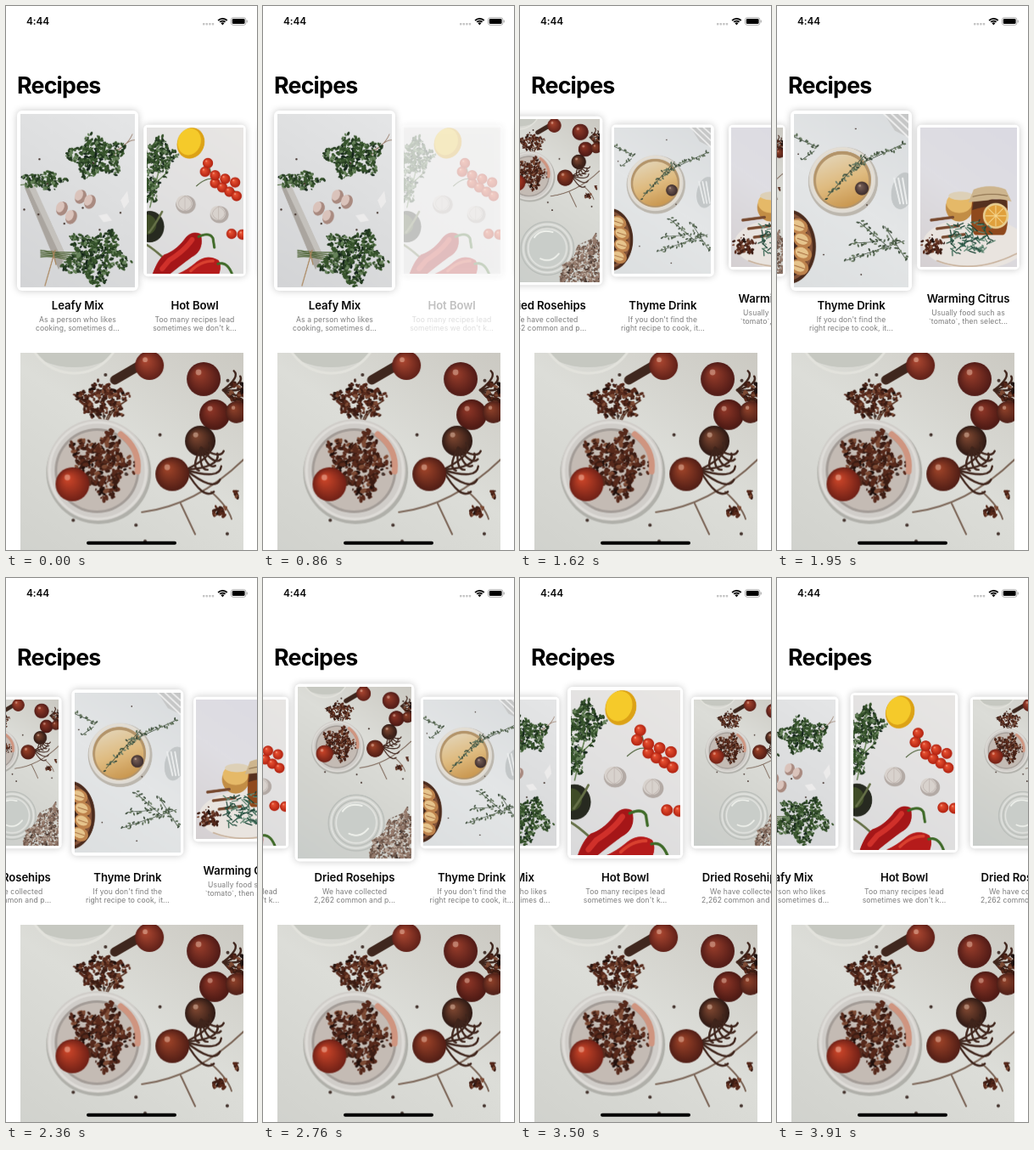
An HTML page with a canvas that plays this animation: 296x640 px, repeating every 3.98 s.

```html
<!DOCTYPE html>
<html lang="en">
<head>
<meta charset="utf-8">
<title>Recipes</title>
<style>
  html, body { margin: 0; width: 100%; height: 100%; overflow: hidden; background: #fff; }
  canvas { display: block; width: 296px; height: 640px; }
</style>
</head>
<body>
<canvas id="stage"></canvas>
<script>
const LOOP = 3980, W = 296, H = 640, TAU = Math.PI * 2;
const canvas = document.getElementById('stage');
const ctx = canvas.getContext('2d');
const ratio = Math.max(1, window.devicePixelRatio || 1);
canvas.width = W * ratio;
canvas.height = H * ratio;

// ---------- drawing helpers ----------
function seeded(seed) {
  return () => {
    seed = (seed * 1664525 + 1013904223) >>> 0;
    return seed / 4294967296;
  };
}

function repeat(n, fn) {
  for (let i = 0; i < n; i++) fn(i);
}

function oval(c, color, x, y, rx, ry = rx, turn = 0) {
  c.fillStyle = color;
  c.beginPath();
  c.ellipse(x, y, rx, ry, turn, 0, TAU);
  c.fill();
}

function ring(c, color, width, x, y, r) {
  c.strokeStyle = color;
  c.lineWidth = width;
  c.beginPath();
  c.arc(x, y, r, 0, TAU);
  c.stroke();
}

function shape(c, color, path) {
  c.fillStyle = color;
  c.fill(new Path2D(path));
}

function line(c, color, width, path) {
  c.strokeStyle = color;
  c.lineWidth = width;
  c.lineCap = 'round';
  c.stroke(new Path2D(path));
}

function backdrop(c, w, h, ...colors) {
  const g = c.createLinearGradient(w, 0, 0, h);
  colors.forEach((color, i) => g.addColorStop(i / (colors.length - 1), color));
  c.fillStyle = g;
  c.fillRect(0, 0, w, h);
}

// A ragged heap of small leaves, lighter ones mostly on top.
function clump(c, seed, x, y, rx, ry, size, colors) {
  const rnd = seeded(seed), count = 1.6 * rx * ry / (size * size);
  repeat(count, i => {
    const a = rnd() * TAU;
    const d = Math.sqrt(rnd()) * (0.85 + 0.2 * Math.sin(a * 5 + seed));
    const r = size * (0.5 + rnd());
    const shade = colors[Math.floor((i / count * 0.5 + rnd() * 0.5) * colors.length)];
    oval(c, shade, x + Math.cos(a) * d * rx, y + Math.sin(a) * d * ry, r, r * 0.6, rnd() * TAU);
  });
}

function sprig(c, seed, x0, y0, x1, y1, leaf = 2) {
  const rnd = seeded(seed), n = Math.hypot(x1 - x0, y1 - y0) / 2.4;
  const off = () => (rnd() - 0.5) * leaf * 3.4;
  line(c, THYME[0], 0.8, `M${x0} ${y0}L${x1} ${y1}`);
  repeat(n, i => {
    const x = x0 + (x1 - x0) * i / n + off(), y = y0 + (y1 - y0) * i / n + off();
    oval(c, THYME[i % THYME.length], x, y, leaf, leaf * 0.5, rnd() * TAU);
  });
}

function specks(c, seed, n, w, h, r) {
  const rnd = seeded(seed);
  repeat(n, () => oval(c, '#45352f', rnd() * w, rnd() * h, r));
}

function ball(c, x, y, r, dark, light) {
  const g = c.createRadialGradient(x - r * 0.3, y - r * 0.35, r * 0.1, x, y, r);
  g.addColorStop(0, light);
  g.addColorStop(1, dark);
  oval(c, g, x, y, r);
  oval(c, 'rgba(255,225,205,.4)', x - r * 0.3, y - r * 0.4, r * 0.17);
}

// Dry sepals fanning out from one side of a fruit.
function sepals(c, x, y, angle, length) {
  repeat(5, i => {
    const a = angle + (i - 2) * 0.38;
    const end = k => `${x + Math.cos(a + k) * length} ${y + Math.sin(a + k) * length}`;
    line(c, '#3f251c', 2.4, `M${x} ${y}Q${end(0.4)} ${end(0)}`);
  });
}

function garlic(c, x, y, r) {
  oval(c, '#b3aaa5', x + 1, y + 1, r, r * 0.92);
  oval(c, '#d8d2cd', x - 1, y - 1, r * 0.82, r * 0.76, 0.5);
  repeat(3, i => line(c, '#b9aea9', 0.7, `M${x} ${y - r * 0.8}Q${x + (i - 1) * r * 1.3} ${y} ${x} ${y + r * 0.7}`));
}

const GREENS = ['#14241a', '#22391f', '#37542c', '#66825a'];
const BROWNS = ['#20100c', '#3c1c13', '#57291b', '#7c4a34'];
const HEATHER = ['#41332d', '#6d564a', '#93796b', '#bbaa9d'];
const THYME = ['#3c4c3b', '#53664e', '#708068'];

// ---------- pictures ----------
function herbs(c) {
  backdrop(c, 135, 205, '#e5e6e7', '#dcddde', '#d3d4d6');
  shape(c, '#aaa59f', 'M5 87L16 84L54 168L45 184Z');
  shape(c, '#c4c1bc', 'M10 87L16 84L54 168L50 174Z');
  line(c, '#8b6a55', 0.7, 'M104 45Q124 42 132 24M110 50Q126 30 135 31');
  line(c, '#4c6938', 1, 'M60 56L86 50M78 76L94 58M0 84L54 78');
  clump(c, 4, 91, 51, 37, 27, 2, GREENS);
  clump(c, 8, 28, 79, 28, 11, 1.8, GREENS);
  repeat(4, i => {
    const x = 48 + i * 11, y = i % 2 ? 122 - i * 9 + 8 : 111 - i * 7;
    oval(c, '#a98a80', x + 1, y + 1, 6.5, 8.5, 0.4);
    oval(c, '#dac3bb', x - 1, y - 1, 4.6, 6.6, 0.4);
  });
  shape(c, '#ecebeb', 'M92 120L102 118L108 126L98 128ZM118 102L126 91L128 104L122 112Z');
  repeat(5, i => line(c, '#4d6335', 1.2, `M24 ${161 + i * 2}Q52 166 84 ${162 + i * 6}`));
  line(c, '#a9855c', 1.2, 'M38 162L42 178M41 161L29 203');
  clump(c, 13, 89, 169, 41, 34, 2.1, GREENS);
  specks(c, 3, 9, 135, 150, 1.2);
}

function vegetables(c) {
  backdrop(c, 135, 205, '#e8e6e4', '#e2e1e1', '#dadadb');
  oval(c, '#dca216', 62, 22, 19, 22, 0.35);
  oval(c, '#f5ca2a', 60, 20, 16, 19, 0.35);
  line(c, '#597844', 1.5, 'M5 112Q12 80 22 45M0 90L30 62');
  clump(c, 21, 16, 42, 28, 30, 2.1, GREENS);
  clump(c, 22, 6, 84, 13, 24, 2, GREENS);
  line(c, '#44582e', 1.2, 'M70 82Q92 62 105 82L126 90M88 55L92 72');
  const tomato = (x, y) => ball(c, x, y, 7.2, '#b0200f', '#ec5535');
  tomato(86, 50);
  repeat(4, i => {
    tomato(82 + 14 * i, 62 + 5 * i);
    tomato(96 + 10 * i, 78 + 6 * i);
  });
  repeat(2, i => tomato(119 + 15 * i, 149 + i));
  garlic(c, 54, 107, 14);
  garlic(c, 101, 121, 13);
  oval(c, '#272a20', 5, 139, 20, 22);
  oval(c, '#3f4c27', 1, 136, 13, 14);
  line(c, '#667148', 3, 'M22 118Q15 132 4 147M0 164Q10 170 22 181');
  shape(c, '#a51618', 'M76 149Q62 143 52 158Q40 173 25 178Q15 186 8 207L31 207Q48 193 63 182Q82 172 76 149Z');
  line(c, '#d0302a', 7, 'M64 157Q54 172 32 186L22 198');
  line(c, '#3f6a28', 3.5, 'M73 153Q88 146 93 155L95 168');
  shape(c, '#b51b1b', 'M101 186Q84 176 68 190Q55 201 39 207L101 207Q106 195 101 186Z');
  line(c, '#d9402f', 4, 'M62 201Q76 187 93 187');
  line(c, '#3f6a28', 3.5, 'M100 191Q113 187 120 206');
}

function rosehips(c) {
  backdrop(c, 264, 398, '#cbc9c2', '#dcddd8', '#d2d3ce', '#c9cdca');
  oval(c, '#c6c8c1', 64, -4, 48, 21);
  ring(c, '#e2e2dc', 3, 64, -32, 56);
  line(c, '#7b6557', 2, 'M144 188Q208 180 264 126M190 178L207 214M226 164Q246 182 250 196');
  line(c, '#3f271e', 11, 'M143 14L112 32');
  ball(c, 153, 15, 17, '#5f2018', '#a94630');
  sepals(c, 240, 44, -0.3, 26);
  ball(c, 217, 31, 20, '#4f1a16', '#963c2a');
  clump(c, 31, 256, 50, 11, 16, 3, BROWNS);
  ball(c, 230, 73, 18, '#4a1813', '#8c3526');
  ball(c, 256, 70, 13, '#4d1e17', '#8d4029');
  ball(c, 213, 104, 18, '#2c1813', '#7d4630');
  sepals(c, 214, 112, 0.9, 27);
  sepals(c, 196, 138, -0.1, 42);
  ball(c, 180, 143, 20, '#501d15', '#9c4228');
  repeat(5, i => line(c, '#5a3a2b', 1.6, `M102 96Q98 74 ${70 + i * 14} ${56 + i % 2 * 10}`));
  clump(c, 35, 97, 56, 35, 23, 2.4, BROWNS);
  oval(c, '#b0b0aa', 93, 141, 62, 61);
  oval(c, '#d0cdc9', 92, 138, 60);
  oval(c, '#a39c97', 91, 139, 50);
  oval(c, '#c4bbb4', 91, 139, 47);
  clump(c, 39, 95, 132, 42, 42, 2.8, BROWNS);
  line(c, '#cf9580', 7, 'M119 96Q142 113 139 140');
  ring(c, '#dedcd8', 3, 92, 139, 57);
  ball(c, 62, 155, 20, '#6f2016', '#c94428');
  clump(c, 42, 234, 187, 11, 8, 3, BROWNS);
  clump(c, 43, 257, 166, 6, 5, 2.5, BROWNS);
  specks(c, 6, 9, 264, 240, 2);
  repeat(4, i => ring(c, i % 2 ? '#e2e4e1' : '#b9bdb9', 3, 136, 316, 65 - i * 6));
  oval(c, '#c9cdc9', 136, 315, 45);
  line(c, '#eef0eb', 4, 'M104 289Q119 268 149 276M119 341Q145 353 164 329');
  c.save();
  c.clip(new Path2D('M264 262L246 292L212 307L194 343L168 359L153 398H264Z'));
  clump(c, 47, 229, 345, 86, 84, 3.2, HEATHER);
  c.restore();
}

function tea(c) {
  backdrop(c, 135, 205, '#d9dcde', '#e4e6e7', '#dcdfe0');
  shape(c, '#c6c7c7', 'M106 0H135V28L119 20Z');
  repeat(3, i => line(c, '#eee', 2, `M${106 + i * 9} 0L135 ${28 - i * 9}`));
  oval(c, '#c3c7c8', 128, 91, 13, 22, 0.2);
  repeat(3, i => line(c, '#eceeee', 2, `M${118 + i * 5} 76L${125 + i * 4} 106`));
  oval(c, '#bcb7ae', 58, 80, 41);
  oval(c, '#dfdbd4', 57, 78, 39);
  oval(c, '#b3946a', 57, 78, 34);
  const g = c.createLinearGradient(45, 48, 68, 110);
  ['#e3d3b4', '#dfbb80', '#c8954d'].forEach((color, i) => g.addColorStop(i / 2, color));
  oval(c, g, 57, 79, 31);
  ring(c, '#e7dfd1', 1.3, 57, 77, 36);
  sprig(c, 52, 40, 97, 84, 48);
  sprig(c, 53, 68, 64, 130, 35);
  ball(c, 80, 88, 8, '#3c2c2c', '#7a625a');
  sprig(c, 55, 0, 27, 27, 39);
  sprig(c, 56, 10, 54, 24, 44, 1.6);
  ['#4b2b1d', '#835238', '#432a20'].forEach((color, i) => oval(c, color, -7, 157, 33 - i * 4, 44 - i * 4));
  repeat(4, i => {
    const x = 6 + 5 * Math.sin(i), y = 133 + i * 16;
    oval(c, '#bd824c', x, y, 11, 9, 0.5);
    oval(c, '#e6c48c', x - 1, y - 1, 8, 6, 0.5);
    line(c, '#a46b3e', 1, `M${x - 6} ${y - 2}L${x + 6} ${y + 2}`);
  });
  sprig(c, 57, 62, 173, 130, 150);
  sprig(c, 58, 77, 128, 112, 158);
  sprig(c, 59, 107, 133, 132, 172);
  sprig(c, 60, 68, 153, 98, 151);
  specks(c, 61, 5, 135, 205, 0.9);
}

function drinks(c) {
  backdrop(c, 135, 196, '#dbdae2', '#dfdee3', '#d5d0d2');
  oval(c, '#e9e4df', 76, 163, 72, 36);
  line(c, '#c9b39e', 2, 'M24 187Q75 207 135 177');
  oval(c, '#c28d45', 55, 112, 19, 20);
  oval(c, '#e5b968', 55, 106, 18, 14);
  oval(c, '#ddd0b7', 57, 96, 17, 6);
  shape(c, '#8f491d', 'M73 101Q69 149 78 151H116Q125 149 122 101Z');
  shape(c, '#55301f', 'M75 101H121L122 113Q99 107 73 116Z');
  shape(c, '#cdb58e', 'M75 87Q98 78 120 87L128 104Q107 98 96 102L68 105Z');
  line(c, '#8f7350', 1.3, 'M74 97Q98 91 122 96');
  oval(c, '#e9cf92', 106, 124, 18);
  oval(c, '#e0a03c', 106, 124, 15);
  repeat(8, i => {
    const a = i * TAU / 8;
    line(c, '#f7d890', 1.2, `M106 124l${14 * Math.cos(a)} ${14 * Math.sin(a)}`);
  });
  clump(c, 66, 18, 165, 18, 14, 2.4, BROWNS);
  repeat(3, i => line(c, '#77492f', 4, `M${16 + i * 8} ${130 + i * 12}l30 -4`));
  const rnd = seeded(68);
  repeat(110, i => {
    const x = 41 + rnd() * 56, y = 132 + rnd() * 44;
    line(c, ['#1c4335', '#2f5f4b', '#628975'][i % 3], 1.5, `M${x} ${y}l${rnd() * 18 - 9} ${rnd() * 14 - 7}`);
  });
}

function paint(draw, w, h) {
  const picture = document.createElement('canvas'), k = 264 / w;
  picture.width = 264;
  picture.height = Math.round(h * k);
  const c = picture.getContext('2d');
  c.scale(k, k);
  draw(c);
  return picture;
}

const cards = [
  { title: 'Leafy Mix', text: ['As a person who likes', 'cooking, sometimes d...'], picture: paint(herbs, 135, 205), h: 172 },
  { title: 'Hot Bowl', text: ['Too many recipes lead', "sometimes we don't k..."], picture: paint(vegetables, 135, 205), h: 172 },
  { title: 'Dried Rosehips', text: ['We have collected', '2,262 common and p...'], picture: paint(rosehips, 264, 398), h: 172 },
  { title: 'Thyme Drink', text: ["If you don't find the", 'right recipe to cook, it...'], picture: paint(tea, 135, 205), h: 172 },
  { title: 'Warming Citrus', text: ['Usually food such as', '`tomato`, then select...'], picture: paint(drinks, 135, 196), h: 164 },
];

// ---------- motion: advances in steps after a rest ----------
const REST = 860, STEP = 105;
const SWIPES = [[0, 0], [4, 187], [10, 411], [18, 252.5], [22, 138], [29, 72.5]];

// Smooth curve through the swipe points, flat where the direction turns.
function scrollAt(step) {
  const last = SWIPES.length - 1;
  if (step <= 0) return 0;
  const i = Math.min(last - 1, SWIPES.findIndex(p => p[0] > step) - 1 >>> 0);
  const rise = j => (SWIPES[j + 1][1] - SWIPES[j][1]) / (SWIPES[j + 1][0] - SWIPES[j][0]);
  const slope = j => {
    if (j === 0 || j === last) return 0;
    const a = rise(j - 1), b = rise(j);
    return a * b > 0 ? 2 * a * b / (a + b) : 0;
  };
  const [x0, y0] = SWIPES[i], [x1, y1] = SWIPES[i + 1];
  const d = x1 - x0, u = Math.min(1, (step - x0) / d), v = 1 - u;
  return y0 * v * v * (1 + 2 * u) + y1 * u * u * (3 - 2 * u) + d * u * v * (slope(i) * v - slope(i + 1) * u);
}

const centre = (index, step) => 84.5 + index * 138 - scrollAt(step);
const swell = x => 1 + 0.0025 * Math.max(0, 80 - Math.abs(x - 90));
const fade = step => step < 0 ? 1 : Math.min(1, 0.25 + step * 0.25);

// ---------- screen ----------
function label(text, x, y, font, color, align = 'center', spacing = 0) {
  ctx.font = `${font} Inter, sans-serif`;
  ctx.letterSpacing = `${spacing}px`;
  ctx.fillStyle = color;
  ctx.textAlign = align;
  ctx.fillText(text, x, y);
}

function box(color, x, y, w, h, r) {
  ctx.fillStyle = color;
  ctx.beginPath();
  ctx.roundRect(x, y, w, h, r);
  ctx.fill();
}

function drawCard(card, x, scale, alpha) {
  const w = 114 * scale, h = card.h * scale, pad = 3.3 * scale;
  const left = x - w / 2, top = 143 + card.h / 2 - h / 2, base = 143 + card.h;
  ctx.save();
  ctx.globalAlpha = alpha;
  ctx.save();
  ctx.shadowColor = 'rgba(0,0,0,.22)';
  ctx.shadowBlur = 8 * ratio;
  box('#fff', left - pad, top - pad, w + pad * 2, h + pad * 2, 5 * scale);
  ctx.restore();
  ctx.drawImage(card.picture, left, top, w, h);
  label(card.title, x, base + 41.5, '600 13.2px', '#080808', 'center', -0.1);
  card.text.forEach((row, i) => label(row, x, base + 57 + i * 10.3, '400 8.6px', '#7c7c7c', 'center', 0.1));
  ctx.restore();
}

function drawStatus() {
  label('4:44', 24, 22.3, '600 11.8px', '#080808', 'left', -0.1);
  repeat(4, i => box('#c4c4c4', 232 + i * 3.6, 20, 2.4, 2.4, 0.6));
  ctx.strokeStyle = '#000';
  ctx.lineCap = 'butt';
  ctx.lineWidth = 1.8;
  [7.2, 4.4].forEach(r => {
    ctx.beginPath();
    ctx.arc(255.4, 22, r, -Math.PI * 0.76, -Math.PI * 0.24);
    ctx.stroke();
  });
  shape(ctx, '#000', 'M255.4 22.6L253.3 20.1Q255.4 18.3 257.5 20.1Z');
  ctx.strokeStyle = '#9a9a9a';
  ctx.lineWidth = 0.8;
  ctx.beginPath();
  ctx.roundRect(265.5, 13.7, 17.4, 8.7, 2.5);
  ctx.stroke();
  box('#000', 266.8, 15, 14.8, 6.1, 1.4);
  box('#999', 283.7, 16.6, 1, 3, 0.5);
}

function draw(time) {
  const step = Math.floor((time - REST) / STEP);
  ctx.setTransform(ratio, 0, 0, ratio, 0, 0);
  ctx.imageSmoothingQuality = 'high';
  ctx.fillStyle = '#fff';
  ctx.fillRect(0, 0, W, H);
  drawStatus();
  label('Recipes', 13, 102.9, '700 26.8px', '#000', 'left', -0.8);
  cards.forEach((card, i) => {
    const x = centre(i, step);
    // The size trails the position a little.
    const scale = (swell(x) + swell(centre(i, step - 1))) / 2;
    drawCard(card, x, scale, i === 1 ? fade(step) : 1);
  });
  ctx.drawImage(cards[2].picture, 16.5, 408, 263.5, 397);
  box('#000', 95, 629.7, 106, 4, 2);
}

const start = performance.now();
function loop() {
  draw((performance.now() - start) % LOOP);
  requestAnimationFrame(loop);
}
loop();
</script>
</body>
</html>
```
